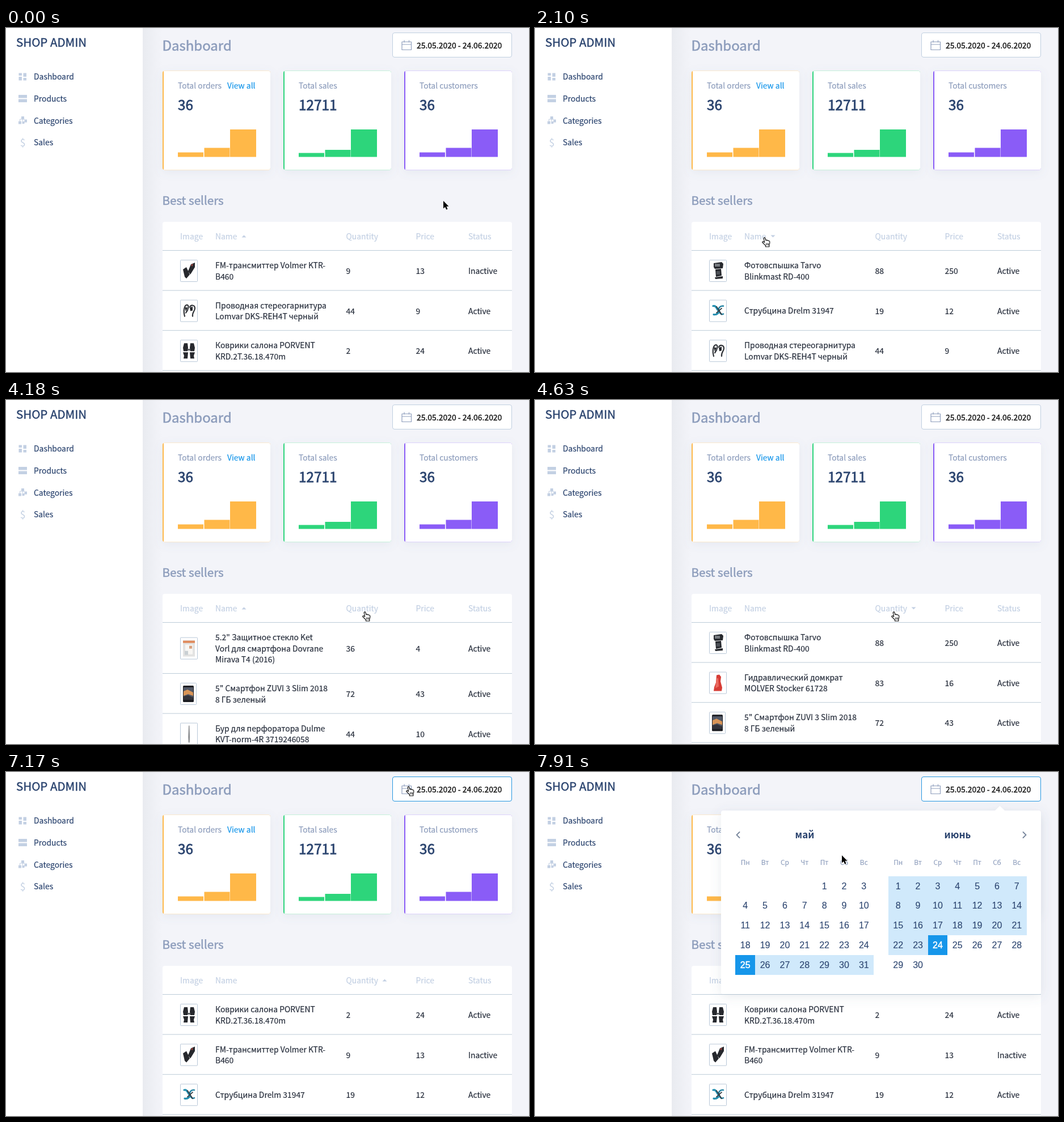
Recreate the animation shown at these times as an HTML page. Size 922 px wide and 607 px high, loop 8000 ms.

```html
<!DOCTYPE html>
<html lang="ru">
<head>
<meta charset="utf-8">
<title>Dashboard</title>
<style>
  html, body { margin: 0; width: 100%; height: 100%; overflow: hidden; background: #f3f4f9; }
  svg { display: block; width: 922px; height: 607px;
    font-family: "Noto Sans CJK JP", "Noto Sans CJK SC", "Noto Sans", sans-serif; }
  .days { font-family: "Liberation Sans", Arial, sans-serif; }
</style>
</head>
<body>
<svg id="stage" viewBox="0 0 922 607" xmlns="http://www.w3.org/2000/svg"></svg>
<script>
const LOOP = 8000;
const NAVY = '#2b446f', GREY = '#8d9dbc', PALE = '#c3d0e3', INK = '#262d3b', BLUE = '#1696ea', LINE = '#bccbd8';

const text = (x, y, s, fill, size = 13.9, weight = 0.2, more = '') =>
  `<text x="${x}" y="${y}" font-size="${size}" fill="${fill}" stroke="${fill}" stroke-width="${weight}" ${more}>${s}</text>`;
const rect = (x, y, w, h, fill, more = '') =>
  `<rect x="${x}" y="${y}" width="${w}" height="${h}" fill="${fill}" ${more}/>`;
const path = (d, fill, more = '') => `<path d="${d}" fill="${fill}" ${more}/>`;
const stroke = (d, color, width) => path(d, 'none', `stroke="${color}" stroke-width="${width}" stroke-linecap="round"`);

// Product pictures, drawn inside a 31 x 38.5 frame
const DARK = '#26282d';
const thumbs = {
  radio: path('M5 17l6-4 6 13-6 7-3-3ZM14 20l5-12 7-3v8l-8 13Z', DARK) + path('M19 9l4-2-2 5Z', '#a8463f'),
  headset: stroke('M8 29C5 18 8 9 12 9s3 8-2 14M17 13c2-5 9-4 9 2 0 5-5 7-4 14', '#33363b', 2.2) +
    path('M8 13l5 1-3 7ZM17 14l5-2v7l-4 1Z', DARK),
  mats: path('M7 6h6l1 8-1 6H6L5 14ZM18 6h6l2 8-1 6h-7l-1-6ZM5 22h9l-1 11H6l1-5ZM17 22h9l-2 6 1 5h-7Z', DARK) +
    path('M13 16h5v3h-5Z', '#5c5f63'),
  glass: rect(5, 5, 21, 29, '#e3e3e2') + rect(5, 6, 21, 4, '#e08a5c') + rect(9, 13, 13, 17, '#f8f7f4') +
    rect(16, 15, 5, 5, '#d9a17f') + rect(8, 24, 6, 7, '#c9cfd3'),
  phone: rect(5, 5, 19, 29, '#1c1d22', 'rx="1.5"') + rect(6, 8, 17, 22, '#525866') +
    path('M6 15l7-3 10 5v6l-9-3-8 3Z', '#d99558') + path('M6 24l8-2 9 4v4H6Z', '#33333b'),
  drill: path('M15 5h1.4l.8 20-.5 10h-2l-.5-10Z', '#8b8d90'),
  flash: path('M8 6l14-2 3 3-1 8-14 1-2-3ZM11 17l10-1 1 12-10 2ZM10 31l14-2v4l-13 1Z', DARK) +
    rect(10, 7, 9, 5, '#777b80') + rect(13, 20, 6, 6, '#4c5056'),
  jack: path('M13 6l5-1 3 4-1 8 3 11-1 6H8l1-7 3-8Z', '#d63c35') + path('M13 12l3-1 1 15-6 3Z', '#ea6a5f'),
  clamp: stroke('M7 11c5-2 6 5 9 8s-2 8-8 7', '#238fb0', 3.2) + stroke('M25 11c-6-1-9 4-8 8s4 8 8 6', '#2b87a6', 2.6) +
    stroke('M13 12l9 14M22 15l-9 8', '#333b42', 1.8)
};

// name lines, quantity, price, status
const goods = {
  radio: [['FM-трансмиттер Volmer KTR-', 'B460'], 9, 13, 'Inactive'],
  headset: [['Проводная стереогарнитура', 'Lomvar DKS-REH4T черный'], 44, 9, 'Active'],
  mats: [['Коврики салона PORVENT', 'KRD.2T.36.18.470m'], 2, 24, 'Active'],
  glass: [['5.2" Защитное стекло Ket', 'Vorl для смартфона Dovrane', 'Mirava T4 (2016)'], 36, 4, 'Active'],
  phone: [['5" Смартфон ZUVI 3 Slim 2018', '8 ГБ зеленый'], 72, 43, 'Active'],
  drill: [['Бур для перфоратора Dulme', 'KVT-norm-4R 3719246058'], 44, 10, 'Active'],
  flash: [['Фотовспышка Tarvo', 'Blinkmast RD-400'], 88, 250, 'Active'],
  jack: [['Гидравлический домкрат', 'MOLVER Stocker 61728'], 83, 16, 'Active'],
  clamp: [['Струбцина Drelm 31947'], 19, 12, 'Active']
};

// start time, sorted column's arrow x, ascending, rows
const views = [
  [0, 419.5, true, ['radio', 'headset', 'mats']],
  [2100, 419.5, false, ['flash', 'clamp', 'headset']],
  [3300, 419.5, true, ['glass', 'phone', 'drill']],
  [4630, 667.5, false, ['flash', 'jack', 'phone']],
  [5670, 667.5, true, ['mats', 'radio', 'clamp']]
];

function row(key, mid) {
  const [lines, count, price, status] = goods[key];
  return `<g transform="translate(307 ${mid - 19.5})">` +
    rect(.5, .5, key === 'phone' ? 28 : 30, 38, '#fff', 'stroke="#b9c8d8" rx="1"') + thumbs[key] + '</g>' +
    lines.map((s, i) => text(369, mid + 5.3 + 19.4 * (i - (lines.length - 1) / 2), s, INK)).join('') +
    text(599.5, mid + 5.5, count, INK) + text(722.5, mid + 5.5, price, INK) + text(815, mid + 5.5, status, INK);
}

function tableView([, x, up, keys]) {
  let top = 393;
  const arrow = up ? `M${x - 4} 369.5h8l-4-4Z` : `M${x - 4} 365.5h8l-4 4Z`;
  return path(arrow, PALE) + keys.map(key => {
    const height = goods[key][0].length > 2 ? 90 : 70.6;
    const out = row(key, top + height / 2 + .2);
    top += height;
    return out + rect(276, top - 1, 616, 1, LINE);
  }).join('');
}

function card(x, color, label, value, heights) {
  return `<g transform="translate(${x} 0)">` +
    rect(0, 75.5, 190, 175, color, 'rx="4" filter="url(#soft)"') +
    path('M2 75.5H186a4 4 0 0 1 4 4V246.500a4 4 0 0 1-4 4H2Z', '#fff') +
    text(27, 106.5, label, GREY) + text(27, 145, value, NAVY, 24.3, .8) +
    heights.map((h, i) => rect(27 + 46 * i + (i === 1 ? .5 : 0), 227.5 - h, i === 2 ? 46 : 45, h, color)).join('') + '</g>';
}

function month(x, title, titleX, offset, count, from, to, marked) {
  const step = 34.85, mid = 'text-anchor="middle"';
  const names = ['Пн', 'Вт', 'Ср', 'Чт', 'Пт', 'Сб', 'Вс'];
  let out = text(titleX, 117, title, NAVY, 17, 0, mid + ' font-weight="bold"');
  names.forEach((s, i) => out += text(x + step * i, 164, s, GREY, 11.9, .1, mid));
  out += '<g class="days">';
  for (let day = 1; day <= count; day++) {
    const cell = day + offset - 1, cx = x + step * (cell % 7), cy = 201 + step * Math.floor(cell / 7);
    const on = day === marked;
    if (day >= from && day <= to)
      out += rect(cx - 17.4, cy - 17.4, step, step, on ? BLUE : '#d0e9fb', 'shape-rendering="crispEdges"');
    out += text(cx, cy + 5.5, day, on ? '#fff' : NAVY, 16, on ? .5 : .1, mid);
  }
  return out + '</g>';
}

const sidebar = rect(241, 0, 34, 607, 'url(#edge)') + rect(0, 0, 241, 607, '#fff') +
  text(18, 33, 'SHOP ADMIN', NAVY, 20.5, .45) +
  ['Dashboard', 'Products', 'Categories', 'Sales'].map((s, i) => text(49, 91 + 38.75 * i, s, NAVY)).join('') +
  path('M22.500 79.500h5.500v4.500h-5.500ZM22.500 86h5.500v6.500h-5.500ZM30.500 79.500h5.500v6.500h-5.500ZM30.500 88h5.500v4.500h-5.500Z', PALE) +
  path('M22 118h15v5.500H22ZM22 125.500h15v5.500H22Z', PALE) +
  path('M27 156h5v5h-5ZM32.500 161.500h4.500v5h-4.500ZM22 164.500h5v5h-5ZM28.500 165h4v4h-4Z', PALE) +
  stroke('M24.500 164v-3h8M29.500 161v5', PALE, 1) +
  text(29.5, 208.5, '$', PALE, 17.5, 0, 'text-anchor="middle"');

const dateBox = rect(681.5, 8.5, 210, 43, '#fff', 'id="date" rx="3.5"') +
  path('M698 24.500h16.500v14H698ZM698 29h16.500M702 21.500v4M710.500 21.500v4', 'none', 'stroke="#8f9fbd" stroke-width="1.2" stroke-linejoin="round"') +
  text(724, 36, '25.05.2020 - 24.06.2020', '#111', 13.95, .3);

const headers = [[307, 'Image'], [369, 'Name'], [599.5, 'Quantity'], [722.5, 'Price'], [815, 'Status']];
const table = path('M276 607V346a4 4 0 0 1 4-4H888a4 4 0 0 1 4 4V607Z', '#fff') +
  headers.map(([x, s]) => text(x, 373, s, PALE)).join('') + rect(276, 392, 616, 1, LINE) +
  views.map(v => `<g class="view">${tableView(v)}</g>`).join('');

const popup = '<g id="popup">' +
  path('M332 68H811l8.500-8 8.500 8H888a4 4 0 0 1 4 4V388a4 4 0 0 1-4 4H332a4 4 0 0 1-4-4V72a4 4 0 0 1 4-4Z', '#fff', 'filter="url(#deep)"') +
  stroke('M360.500 106l-5 5 5 5M860.500 106l5 5-5 5', '#77869c', 1.8) +
  month(370.7, 'май', 475.5, 4, 31, 25, 31, 25) + month(640.2, 'июнь', 745, 0, 30, 1, 24, 24) + '</g>';

const cursors = '<g id="arrow">' +
  path('M0 0V13.500L3.100 10.700 5.200 15.500 7.500 14.500 5.400 9.800H9.500Z', '#000', 'stroke="#fff" stroke-width="1" paint-order="stroke"') +
  '</g><g id="hand"><g transform="translate(-4 -1)">' +
  path('M3.200 2C3.500.6 5.500.6 5.900 2L7 5.800c.6-.9 2-.8 2.500.3.800-.7 2-.4 2.300.6 1-.3 1.900.3 2 1.400.2 2.500 0 4-1 6V17H6.500V15.200C5 13.400 3.600 11.800 1.200 9.800.2 8.600 1.400 7.400 2.800 8.100L4.600 9.300Z', '#fff', 'stroke="#111" stroke-width="1.200" stroke-linejoin="round"') +
  stroke('M7.600 11v3M9.600 11v3M11.500 11v3', '#111', .9) + '</g></g>';

const svg = document.getElementById('stage');
svg.innerHTML = `<defs>
  <linearGradient id="edge"><stop offset="0" stop-color="#e9ebf0"/><stop offset="1" stop-color="#f3f4f9"/></linearGradient>
  <filter id="soft" x="-20%" y="-20%" width="140%" height="150%"><feDropShadow dx="0" dy="4" stdDeviation="8" flood-color="#70809c" flood-opacity=".1"/></filter>
  <filter id="deep" x="-10%" y="-10%" width="120%" height="125%"><feDropShadow dx="0" dy="4" stdDeviation="10" flood-color="#60708c" flood-opacity=".14"/></filter>
  </defs>` + rect(0, 0, 922, 607, '#f3f4f9') + sidebar +
  text(275.5, 40, 'Dashboard', GREY, 24, .6) + dateBox +
  card(276, '#ffb848', 'Total orders', '36', [8, 16, 48.5]) + text(390, 106.5, 'View all', BLUE) +
  card(489, '#2dd57b', 'Total sales', '12711', [7, 12.5, 48.5]) +
  card(702, '#8a5cf7', 'Total customers', '36', [8, 16, 48.5]) +
  text(275.5, 312, 'Best sellers', GREY, 20.6, .5) + table + popup + cursors;

// first change, last change, steps, end point, upward bow
const moves = [
  [600, 1500, 7, 404, 370, 0],
  [3740, 4180, 4, 632, 374, 13],
  [6270, 7170, 7, 709, 26, 0],
  [7760, 7910, 2, 541, 147, 0]
];

function pointer(t) {
  let x = 771, y = 305;
  for (const [a, b, n, toX, toY, bow] of moves) {
    if (t < a) break;
    const k = Math.min(n, Math.floor((t - a) / (b - a) * (n - 1) + 1e-6) + 1);
    const p = k / n, e = p * p * (3 - 2 * p);
    x += (toX - x) * e;
    y += (toY - y) * e - bow * Math.sin(Math.PI * p);
  }
  return [x, y];
}

const byId = id => document.getElementById(id);
const show = (el, on) => el.setAttribute('display', on ? 'inline' : 'none');
const groups = [...svg.querySelectorAll('.view')];
const inside = (x, y, l, t, r, b) => x >= l && x <= r && y >= t && y <= b;

function draw(t) {
  const current = views.findLastIndex(v => t >= v[0]);
  groups.forEach((g, i) => show(g, i === current));
  const open = t >= 7320;
  show(byId('popup'), open);

  const [x, y] = pointer(t);
  const onDate = inside(x, y, 681, 8, 892, 52);
  const onHeader = inside(x, y, 369, 357, 424, 380) || inside(x, y, 599, 357, 672, 380);
  const hand = onDate || onHeader && !open;
  byId('date').setAttribute('stroke', onDate || open ? '#2596e0' : '#c0cfe0');
  for (const id of ['arrow', 'hand']) {
    byId(id).setAttribute('transform', `translate(${x} ${y})`);
    show(byId(id), (id === 'hand') === hand);
  }
}

function frame() {
  draw(performance.now() % LOOP);
  requestAnimationFrame(frame);
}
frame();
</script>
</body>
</html>
```
